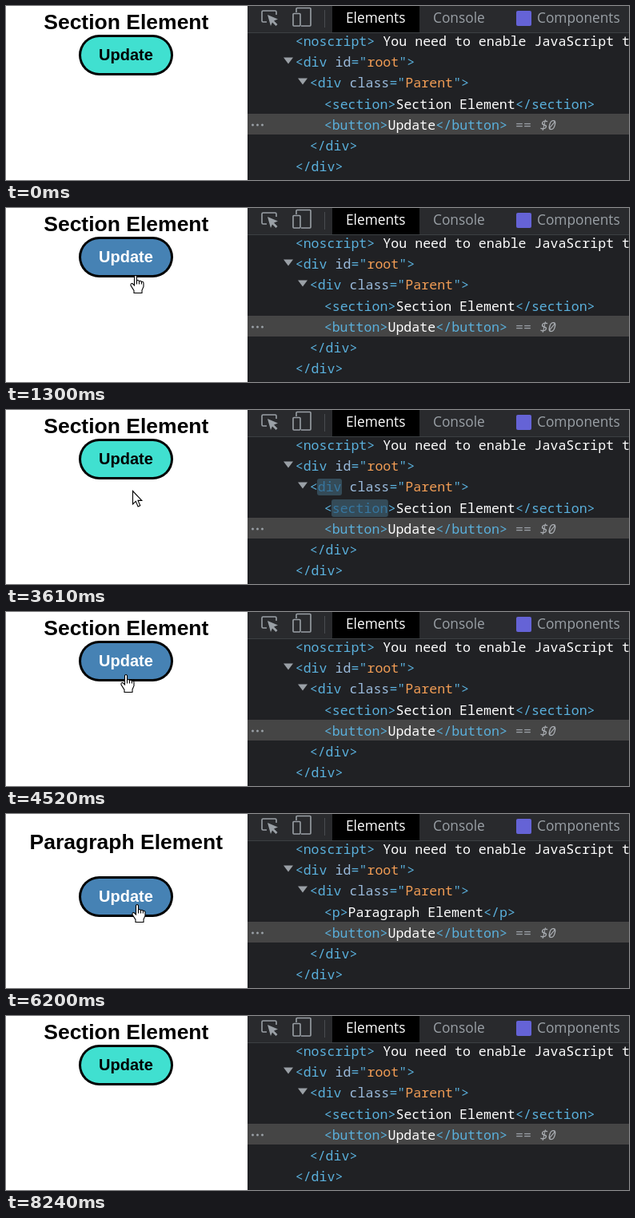
These frames come from a looping animation (779 by 218 pixels, 8500 ms). An HTML page with a canvas:

```html
<!DOCTYPE html>
<html lang="en">
<head>
<meta charset="utf-8">
<title>Element switch</title>
<style>
html, body { margin: 0; width: 100%; height: 100%; overflow: hidden; background: #fff; }
canvas { display: block; }
</style>
</head>
<body>
<canvas id="stage" width="779" height="218"></canvas>
<script>
const ctx = document.getElementById('stage').getContext('2d');
const LOOP = 8500, CHAR = 9.97, LEFT = 302;
const MONO = '500 16.6px "Noto Sans Mono", monospace';
const SANS = '"Liberation Sans", Arial, sans-serif';
const TAG = [90, 176, 220], NAME = '#9bbbdc', VALUE = '#f29d55', WHITE = '#fff', GREY = '#9aa0a6';
const PANEL = [32, 33, 36];

// Bursts of motion: start, end, number of steps
const BURSTS = [
  [480, 1300, 13], [1850, 2690, 13], [2760, 3110, 6], [3260, 4100, 13], [4170, 4520, 6], [4730, 4730, 1],
  [4870, 5710, 13], [5780, 6200, 7], [6560, 6560, 1], [6700, 7540, 13], [7610, 7890, 5], [8240, 8240, 1]
];
const CLICKS = [1850, 3260, 4940, 6840];

// Pointer path: time, x, y
const PATH = [
  [480, 5, 206], [1300, 161, 84], [2270, 161, 84], [2760, 163, 113], [3110, 163, 113], [3400, 163, 112],
  [3900, 152, 82], [4520, 149, 78], [4940, 149, 79], [5360, 162, 170], [5640, 162, 165],
  [6200, 163, 113], [6840, 163, 113], [7190, 162, 146], [7540, 92, 180], [7820, 5, 206]
];

const mix = (a, b, k) => a + (b - a) * k;
const blend = (a, b, k) => a.map((v, i) => mix(v, b[i], k));
const rgb = c => `rgb(${c.map(Math.round).join(',')})`;

function stepTime(t) {
  let last = 0;
  for (const [start, end, count] of BURSTS) {
    if (t < start) break;
    const gap = count > 1 ? (end - start) / (count - 1) : 1;
    last = start + Math.min(count - 1, Math.floor((t - start) / gap + 1e-6)) * gap;
  }
  return last;
}

function pointerAt(t) {
  if (t < 480 || t >= 7885) return null;
  let i = 0;
  while (i < PATH.length - 2 && t >= PATH[i + 1][0]) i++;
  const [t0, x0, y0] = PATH[i], [t1, x1, y1] = PATH[i + 1];
  const k = Math.min(1, (t - t0) / (t1 - t0)), e = k * k * (3 - 2 * k);
  return { x: Math.round(mix(x0, x1, e)), y: Math.round(mix(y0, y1, e)) };
}

// cubic-bezier(0, 0, .2, 1)
function easeOut(x) {
  let lo = 0, hi = 1;
  for (let i = 0; i < 20; i++) {
    const s = (lo + hi) / 2;
    if (0.6 * (1 - s) * s * s + s * s * s < x) lo = s; else hi = s;
  }
  return 3 * (1 - lo) * lo * lo + lo ** 3;
}

function flashAt(age) {
  if (age < 0 || age >= 1000) return null;
  const softBack = [45, 64, 75], softInk = [64, 136, 182];
  if (age < 800) {
    const k = easeOut(age / 800);
    return { back: blend([80, 115, 135], softBack, k), ink: blend([20, 50, 75], softInk, k) };
  }
  const k = easeOut((age - 800) / 200);
  return { back: blend(softBack, PANEL, k), ink: blend(softInk, TAG, k) };
}

function box(x, y, w, h, fill, r = 0) {
  ctx.fillStyle = fill;
  ctx.beginPath();
  ctx.roundRect(x, y, w, h, r);
  ctx.fill();
}

function text(str, x, y, font, fill, align = 'left') {
  ctx.font = font;
  ctx.fillStyle = fill;
  ctx.textAlign = align;
  ctx.fillText(str, x, y);
}

function code(x, y, ...runs) {
  for (const [str, fill] of runs) {
    text(str, x, y, MONO, fill);
    x += str.length * CHAR;
  }
}

function triangle(x, y) {
  ctx.fillStyle = GREY;
  ctx.beginPath();
  ctx.moveTo(x, y);
  ctx.lineTo(x + 12, y);
  ctx.lineTo(x + 6, y + 8);
  ctx.fill();
}

function drawPage(para, hover, top) {
  box(0, 0, LEFT, 218, '#fff');
  text(para ? 'Paragraph Element' : 'Section Element', 150.3, para ? 44 : 29, 'bold 26.5px ' + SANS, '#000', 'center');
  box(91, top, 118, 51, '#000', 25.5);
  box(94, top + 3, 112, 45, hover ? '#4682b4' : '#40e0d0', 22.5);
  text('Update', 150, top + 32, 'bold 20px ' + SANS, hover ? '#fff' : '#000', 'center');
}

const inspectBox = new Path2D('M326 20H321.5Q320 20 320 18.5V7.5Q320 6 321.5 6H336.5Q338 6 338 7.5V11');
const inspectArrow = new Path2D('M327 11L340 16.5L335 18.5L339.5 23L337.5 25L333 20.5L331 25Z');
const device = new Path2D('M363 8V3.5Q363 2.5 364 2.5H380Q381 2.5 381 3.5V24Q381 25 380 25H369M359 10.5Q359 9.5 360 9.5H367Q368 9.5 368 10.5V24Q368 25 367 25H360Q359 25 359 24Z');

function drawToolbar() {
  const ui = '17.3px "Open Sans", "Noto Sans", sans-serif';
  box(LEFT, 0, 477, 33, '#292a2d');
  box(LEFT, 33, 477, 1, '#3c4043');
  ctx.strokeStyle = ctx.fillStyle = GREY;
  ctx.lineWidth = 1.6;
  ctx.stroke(inspectBox);
  ctx.fill(inspectArrow);
  ctx.stroke(device);
  box(398, 5, 1, 22, '#494c50');
  box(408, 0, 109, 33, '#000');
  text('Elements', 425, 21, ui, '#fff');
  text('Console', 534, 21, ui, GREY);
  box(638, 6, 19, 19, '#6563d6', 2);
  text('Components', 664, 21, ui, GREY);
}

function drawTree(para, flash) {
  const tag = rgb(TAG), ink = flash ? rgb(flash.ink) : tag;
  const el = para ? 'p' : 'section';
  const attr = (name, value) => [[' ' + name, NAME], ['="', tag], [value, VALUE], ['">', tag]];
  box(LEFT, 34, 477, 184, rgb(PANEL));
  box(LEFT, 135, 477, 26, '#454545');
  if (flash) {
    box(389, 86, 31, 21, rgb(flash.back), 3);
    box(407, 112, el.length * CHAR + 1, 22, rgb(flash.back), 3);
  }
  triangle(347, 64.5);
  triangle(365, 90.5);
  code(361.7, 50, ['<noscript>', tag], [' You need to enable JavaScript to', WHITE]);
  code(361.7, 76, ['<div', tag], ...attr('id', 'root'));
  code(379.7, 102, ['<', tag], ['div', ink], ...attr('class', 'Parent'));
  code(397.7, 129, ['<', tag], [el, ink], ['>', tag], [para ? 'Paragraph Element' : 'Section Element', WHITE], [`</${el}>`, tag]);
  code(397.7, 155, ['<button>', tag], ['Update', WHITE], ['</button>', tag], [' == ', GREY]);
  text('$0', 666.5, 155, 'italic ' + MONO, '#a9adb2');
  for (let i = 0; i < 3; i++) box(307 + i * 6, 147.5, 3, 3, GREY, 1.5);
  code(379.7, 181, ['</div>', tag]);
  code(361.7, 207, ['</div>', tag]);
}

const arrow = new Path2D('M-.5 .5V17L3.3 13.4L6.1 20L8.8 18.8L6 12.4H10.8Z');
const hand = new Path2D('M-.5 1.5Q1 -.5 2.5 1.5V7Q4.2 5.7 5.5 7.6Q7.2 6.6 8.4 8.4Q10.5 7.6 11 10V14.5L9 19V22.5H-1V19.5L-5 13Q-5.4 10.2 -3 10.6L-.5 13Z');
const knuckles = new Path2D('M2.5 7V11.5M5.5 7.6V11.5M8.4 8.4V11.5');

function drawPointer({ x, y }, hover) {
  ctx.save();
  ctx.translate(x, y);
  ctx.fillStyle = '#fff';
  ctx.strokeStyle = '#000';
  ctx.lineWidth = 1.1;
  ctx.fill(hover ? hand : arrow);
  ctx.stroke(hover ? hand : arrow);
  if (hover) ctx.stroke(knuckles);
  ctx.restore();
}

function draw(now) {
  const t = stepTime(now % LOOP);
  const past = CLICKS.filter(c => t >= c);
  const para = past.length % 2 === 1;
  const flash = past.length ? flashAt(t - past[past.length - 1]) : null;
  const pointer = pointerAt(t);
  const top = para ? 78 : 36;
  const hover = !!pointer && pointer.x >= 91 && pointer.x < 209 && pointer.y >= top && pointer.y < top + 51;

  drawPage(para, hover, top);
  drawTree(para, flash);
  drawToolbar();
  if (pointer) drawPointer(pointer, hover);
}

const begin = performance.now();
function tick() {
  draw(performance.now() - begin);
  requestAnimationFrame(tick);
}
tick();
</script>
</body>
</html>
```
